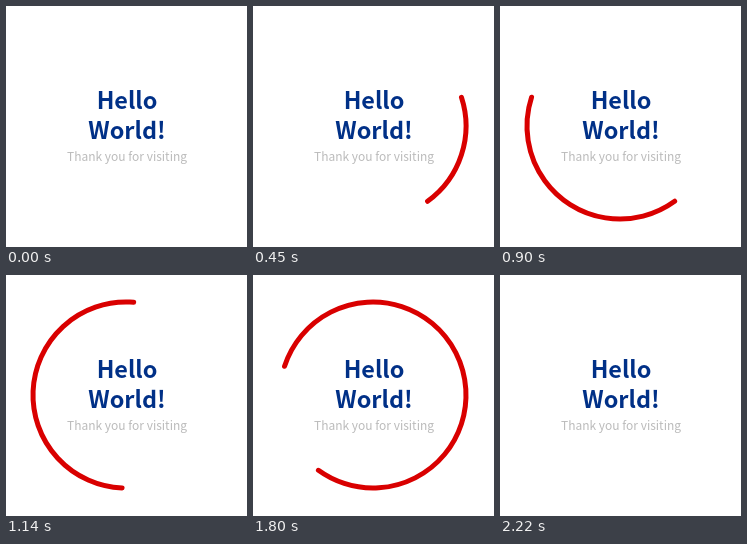
Animation of 241x241 px, one loop 2.25 s. Source, as an HTML page:

```html
<!DOCTYPE html>
<html lang="en">
<head>
<meta charset="utf-8">
<title>Hello World!</title>
<style>
  html, body { margin: 0; height: 100%; overflow: hidden; background: #fff; }
  svg { display: block; width: 241px; height: 241px; }
  text { font-family: "Noto Sans CJK SC", "Noto Sans CJK JP", "Noto Sans CJK", "Noto Sans", sans-serif; text-anchor: middle; }
  .title { font-size: 23.4px; font-weight: 700; fill: #003087; }
  .note { font-size: 12px; fill: #bbb; }
  #ring { fill: none; stroke: #d90000; stroke-width: 5; stroke-linecap: round; }
</style>
</head>
<body>
<svg viewBox="0 0 241 241">
  <circle id="ring" cx="120" cy="120" r="93" pathLength="360" visibility="hidden"/>
  <text class="title" x="121" y="103">Hello</text>
  <text class="title" x="121" y="133">World!</text>
  <text class="note" x="121" y="155">Thank you for visiting</text>
</svg>
<script>
  const LOOP = 2250, STEP = 30;
  const ring = document.getElementById('ring');

  // The tail makes one turn per loop while the arc grows by the same angle.
  function draw(now) {
    const time = Math.floor(((now + 2) % LOOP) / STEP) * STEP;
    const angle = 360 * time / LOOP;
    const visible = time > 0 && time < LOOP - STEP;
    ring.setAttribute('visibility', visible ? 'visible' : 'hidden');
    ring.setAttribute('stroke-dasharray', `${angle} 720`);
    ring.setAttribute('transform', `rotate(${angle - 90} 120 120)`);
    requestAnimationFrame(draw);
  }
  requestAnimationFrame(draw);
</script>
</body>
</html>
```
